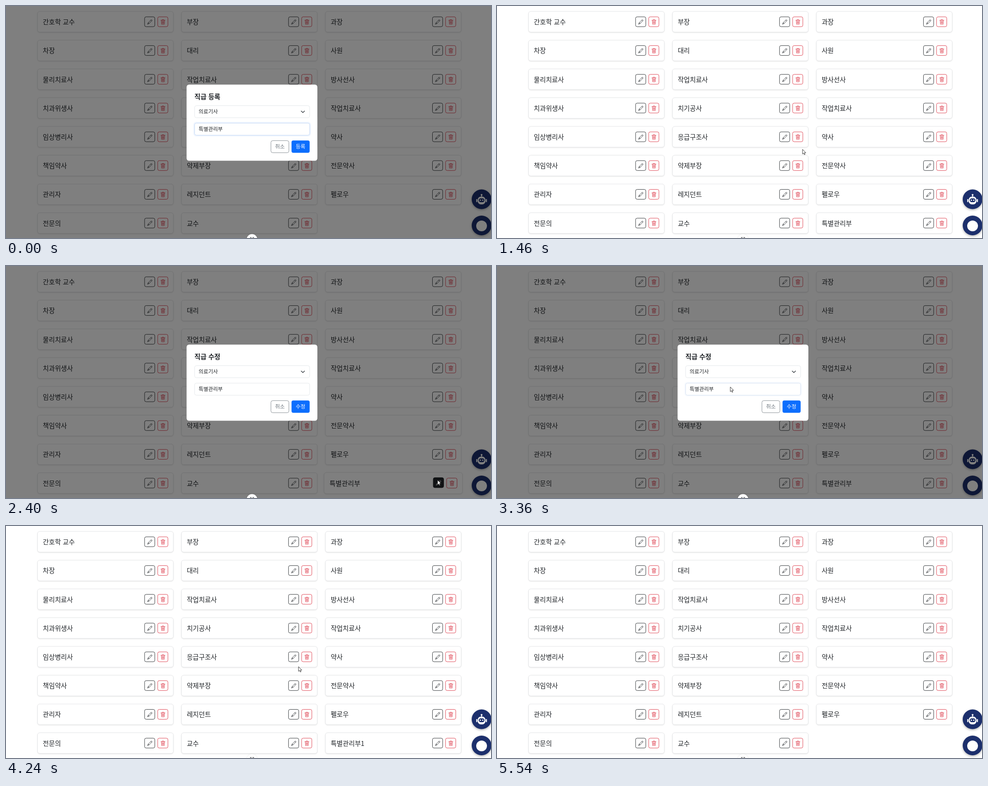
An HTML page for the animation above (6.15 s loop, 1081 by 518 pixels).

```html
<!DOCTYPE html>
<html lang="ko">
<head>
<meta charset="utf-8">
<style>
  html, body { margin: 0; width: 100%; height: 100%; overflow: hidden; background: #fff; }
  svg { display: block; font-family: "Noto Sans CJK KR", "Noto Sans KR", "Noto Sans CJK", sans-serif; }
  text { fill: #212529; font-size: 11.67px; white-space: pre; }
  .name { font-size: 14.6px; font-weight: 500; }
  .title { font-size: 14.6px; font-weight: 700; }
  .card { fill: #fff; stroke: #dfe0e2; stroke-width: .8; filter: drop-shadow(0 1.2px 1.2px rgba(0,0,0,.1)); }
  .field { fill: #fff; stroke: #dee2e6; stroke-width: .8; }
  .btn { transform: translateY(calc(var(--h, 0) * -1px)); }
  .btn .fill { fill-opacity: var(--h, 0); }
  .btn .lit { opacity: var(--h, 0); }
  .fab { fill: #1c2f6c; filter: drop-shadow(0 2px 2.5px rgba(0,0,0,.3)); }
</style>
</head>
<body>
<svg id="stage" width="1081" height="518" viewBox="0 0 1081 518">
  <defs>
    <g id="pencil" fill="none" stroke-width="1.1" stroke-linejoin="round">
      <path d="M12.5 .8l2.7 2.7L5.2 13.5l-4.4 1.7 1.7-4.4zM10.5 2.8l2.7 2.7M2.6 10.9h1.6v1.2h1.2v1.3"/>
    </g>
    <g id="trash" fill="none" stroke-width="1.1" stroke-linecap="round" stroke-linejoin="round">
      <path d="M1.5 3h13M5.5 3V1h5v2M2.9 3l.9 12.3h8.4L13.1 3M5.6 5.5l.3 7.3M8 5.5v7.3M10.4 5.5l-.3 7.3"/>
    </g>
  </defs>
  <g id="cards"></g>
  <circle class="fab" cx="1060" cy="431.5" r="22"/>
  <g fill="#fff">
    <circle cx="1060" cy="421.8" r="2"/>
    <rect x="1059.2" y="422" width="1.6" height="5"/>
    <rect x="1048" y="431" width="2.4" height="7" rx="1.2"/>
    <rect x="1069.6" y="431" width="2.4" height="7" rx="1.2"/>
    <rect x="1051.2" y="425.5" width="17.6" height="17.5" rx="7.5"/>
    <rect x="1053.6" y="429.5" width="12.8" height="8.4" rx="4.2" fill="#1c2f6c"/>
    <circle cx="1057.3" cy="433.6" r="1.5"/>
    <circle cx="1062.7" cy="433.6" r="1.5"/>
  </g>
  <circle class="fab" cx="1060" cy="490" r="22"/>
  <circle cx="1060" cy="491" r="12" fill="#fff"/>

  <g id="modal">
    <rect width="1081" height="518" fill="#000" opacity=".5"/>
    <rect x="402.5" y="175.5" width="291.5" height="170" rx="5.5" fill="#fff"/>
    <text id="heading" class="title" x="420" y="208.3"></text>
    <rect class="field" x="420.4" y="222.5" width="256.4" height="27" rx="4"/>
    <text x="429.3" y="240.4">의료기사</text>
    <path d="M658 234.4l3.7 3.6 3.7-3.6" fill="none" stroke="#343a40" stroke-width="1.4" stroke-linecap="round" stroke-linejoin="round"/>
    <rect id="ring" x="418.9" y="260" width="259.4" height="30" rx="5.5" fill="none" stroke="#0d6efd" stroke-width="3"/>
    <rect id="input" class="field" x="420.4" y="261.5" width="256.4" height="27" rx="4"/>
    <text id="value" x="429.3" y="279.4"></text>
    <rect x="590.5" y="300.6" width="40" height="27" rx="4" fill="#fff" stroke="#6c757d" stroke-width=".8"/>
    <text x="610.6" y="318.4" text-anchor="middle" style="fill:#6c757d">취소</text>
    <g id="ok" class="btn">
      <rect x="636.4" y="300.3" width="40.4" height="27.5" rx="4" fill="#0d6efd"/>
      <rect class="lit" x="636.4" y="300.3" width="40.4" height="27.5" rx="4" fill="#0b5ed7"/>
      <text id="okText" x="656.6" y="318.4" text-anchor="middle" style="fill:#fff;font-weight:500"></text>
    </g>
  </g>

  <circle cx="548.3" cy="521" r="11.8" fill="#fff" style="filter:drop-shadow(0 0 1px rgba(0,0,0,.12))"/>
  <path d="M544 516.8h3.6M549.2 516.8h3.6M545 517l-1.2 2M551.6 517l1.2 2M546.5 519h3.6" fill="none" stroke="#444" stroke-width="1"/>

  <g id="cursor" fill="#fff" stroke="#222" stroke-width=".9" stroke-linejoin="round">
    <path id="arrow" d="M0 0V10.5L2.4 8.4 4 12 5.7 11.3 4.1 7.7H7.3Z"/>
    <path id="hand" d="M-1.2 .8a1.2 1.2 0 0 1 2.4 0V5l4 .9q1 .3 .9 1.5L5.3 11 4.8 14H-1L-4.3 9.4q-.4-1.5.9-1.3L-1.2 9Z"/>
  </g>
</svg>
<script>
const LOOP = 6150;
const $ = id => document.getElementById(id);
const names = ['간호학 교수', '부장', '과장', '차장', '대리', '사원', '물리치료사', '작업치료사', '방사선사',
  '치과위생사', '치기공사', '작업치료사', '임상병리사', '응급구조사', '약사', '책임약사', '약제부장', '전문약사',
  '관리자', '레지던트', '펠로우', '전문의', '교수', '특별관리부'];

const button = (x, y, icon, color) => {
  const glyph = (stroke, cls) =>
    `<use href="#${icon}" class="${cls}" stroke="${stroke}" transform="translate(${x + 5.9} ${y + 5.5}) scale(.729)"/>`;
  return `<g class="btn ${icon}"><rect class="fill" x="${x}" y="${y}" width="22.8" height="22" rx="3.5"
    fill="${color}" stroke="${color}" stroke-width=".9"/>${glyph(color, '')}${glyph('#fff', 'lit')}</g>`;
};

$('cards').innerHTML = names.map((name, i) => {
  const x = 70.3 + 320.8 * (i % 3), y = 12.1 + 64.22 * Math.floor(i / 3);
  return `<g><rect class="card" x="${x}" y="${y}" width="302.6" height="46.2" rx="5"/>
    <text class="name" x="${x + 11.8}" y="${y + 29}">${name}</text>
    ${button(x + 238.6, y + 12.1, 'pencil', '#212529')}${button(x + 267.8, y + 12.1, 'trash', '#dc3545')}</g>`;
}).join('');
const newCard = $('cards').lastElementChild;
const newName = newCard.querySelector('text');
const pencil = newCard.querySelector('.pencil'), trash = newCard.querySelector('.trash');

// Pointer stops: time, x, y
const path = [
  [70, 1038, 503], [390, 738, 327], [590, 738, 327], [950, 662, 317], [1300, 662, 317],
  [1390, 675, 317], [1460, 681, 320], [1590, 681, 320], [2050, 962, 478], [2540, 962, 478],
  [2850, 600, 219], [3150, 520, 270], [3550, 520, 270], [3830, 652, 314], [4240, 652, 314],
  [4520, 1018, 494], [4780, 991.5, 486], [5180, 991.5, 486], [5450, 676, 152]
];

const clamp = v => Math.min(1, Math.max(0, v));
const ease = v => v * v * (3 - 2 * v);
const within = (t, a, b) => t >= a && t < b;
const fade = (t, inAt, outAt, d = 150) => ease(clamp((t - inAt) / d)) * (1 - ease(clamp((t - outAt) / d)));
const show = (el, on) => el.setAttribute('visibility', on ? 'inherit' : 'hidden');

function pointer(t) {
  const i = path.findIndex(p => p[0] > t);
  if (i < 0) return path[path.length - 1].slice(1);
  if (!i) return path[0].slice(1);
  const [a, b] = [path[i - 1], path[i]];
  const k = ease((t - a[0]) / (b[0] - a[0]));
  return [a[1] + (b[1] - a[1]) * k, a[2] + (b[2] - a[2]) * k];
}

function draw(t) {
  const editing = t >= 1455;
  show($('modal'), !editing || within(t, 2325, 4235));
  $('heading').textContent = editing ? '직급 수정' : '직급 등록';
  $('okText').textContent = editing ? '수정' : '등록';
  $('value').textContent = '특별관리부' + (within(t, 3480, 4235) ? '1' : '');
  $('ok').style.setProperty('--h', editing ? fade(t, 3740, 4235) : fade(t, 850, 1455));

  const focus = editing ? fade(t, 3290, 4010) : 1 - ease(clamp((t - 1230) / 150));
  $('input').style.stroke = `color-mix(in srgb, #b4cff2 ${focus * 100}%, #dee2e6)`;
  $('ring').setAttribute('opacity', focus * .06);

  show(newCard, within(t, 1455, 5465));
  newName.textContent = '특별관리부' + (t >= 4235 ? '1' : '');
  const scale = 1 + .02 * (fade(t, 1930, 2430) + fade(t, 4600, 5190));
  newCard.setAttribute('transform', `translate(863.2 484.7) scale(${scale}) translate(-863.2 -484.7)`);
  pencil.style.setProperty('--h', fade(t, 1980, 2480));
  trash.style.setProperty('--h', fade(t, 4680, 5190));

  const pointing = within(t, 4680, 5190);
  show($('cursor'), within(t, 70, 5465));
  show($('arrow'), !pointing);
  show($('hand'), pointing);
  $('cursor').setAttribute('transform', `translate(${pointer(t)})`);
}

function tick() {
  draw(performance.now() % LOOP);
  requestAnimationFrame(tick);
}
tick();
</script>
</body>
</html>
```
